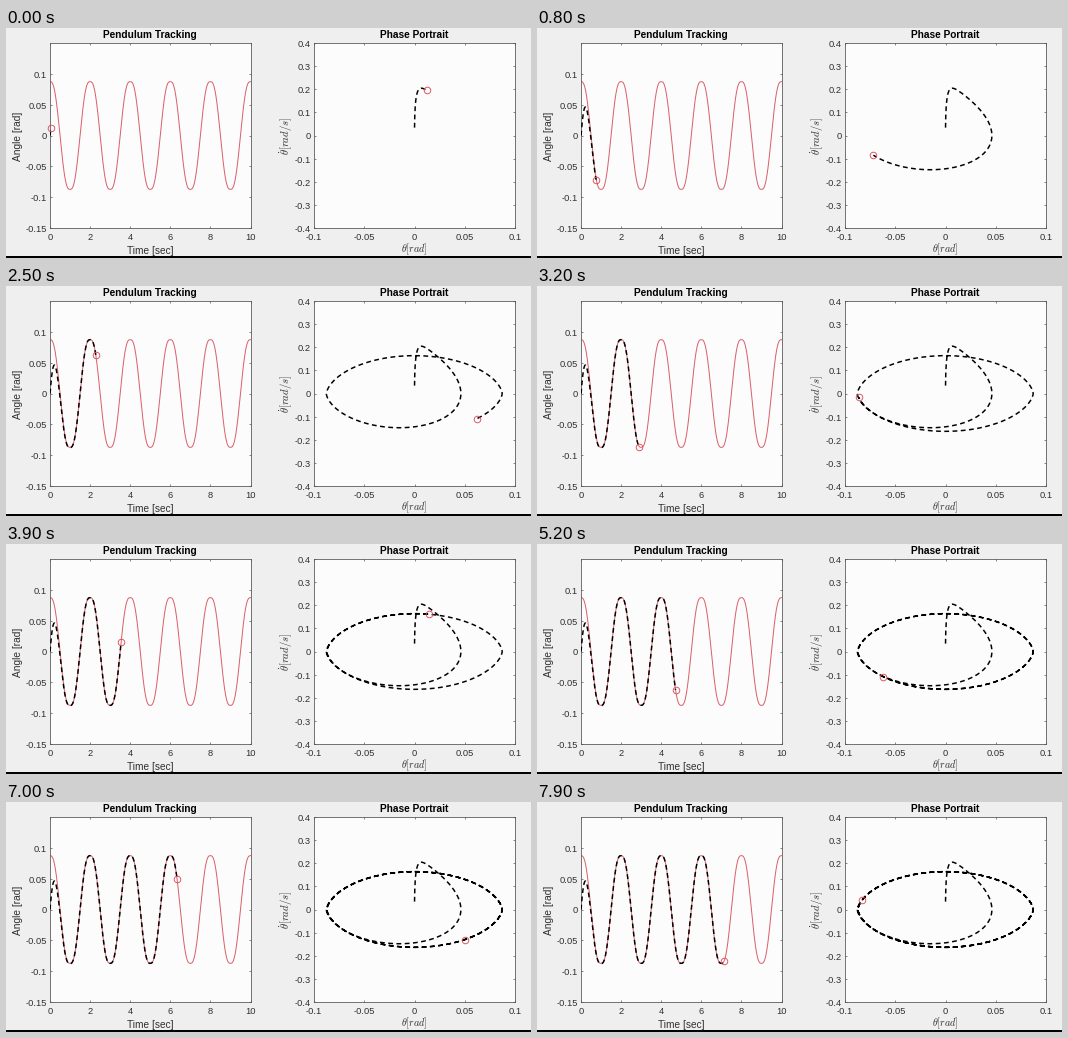
Animation, 525 px wide and 230 px high, one loop 8000 ms. Source, as a matplotlib script:

```python
import numpy as np
import matplotlib.pyplot as plt
from matplotlib.animation import FuncAnimation
from matplotlib.patches import Rectangle

W, H, DPI = 525, 230, 80
FRAMES, INTERVAL = 80, 100
PX = 72 / DPI  # points per pixel

AMP = np.deg2rad(5)
SLOW, FAST = 2.65, 80.0  # closed-loop poles
T0, STEP = 0.035, 0.09

BG, PANEL, INK, RED = "#efeff0", "#fcfcfd", "#303030", "#d9616b"
plt.rcParams.update({
    "font.family": "Liberation Sans",
    "mathtext.fontset": "cm",
    "axes.unicode_minus": False,
})


def reference(t):
    """Quintic swings between +AMP and -AMP, one per second."""
    n = np.floor(t)
    u = t - n
    sign = 1 - 2 * (n % 2)
    angle = sign * AMP * (1 - 2 * u**3 * (10 - 15 * u + 6 * u**2))
    rate = -sign * AMP * 30 * (u * (1 - u)) ** 2
    return angle, rate


def pendulum(t):
    """Reference plus the decaying start-up error."""
    angle, rate = reference(t)
    tau = 2 * t
    slow, fast = np.exp(-SLOW * tau), np.exp(-FAST * tau)
    gap = FAST - SLOW
    error = -AMP * (FAST * slow - SLOW * fast) / gap
    error_rate = AMP * FAST * SLOW * (slow - fast) / gap
    return angle + error, rate + error_rate


fig = plt.figure(figsize=(W / DPI, H / DPI), dpi=DPI, facecolor=BG)


def label(x, y, text, size, **kw):
    kw = {"ha": "center", "va": "center", "color": INK, **kw}
    fig.text(x / W, 1 - y / H, text, fontsize=size * PX, **kw)


def make_axes(left, right, xlim, ylim, xticks, yticks, title):
    top, bottom = 15, 200
    ax = fig.add_axes([left / W, 1 - bottom / H,
                       (right - left) / W, (bottom - top) / H],
                      facecolor=PANEL)
    ax.set(xlim=xlim, ylim=ylim, xticks=xticks, yticks=yticks)
    ax.tick_params(direction="in", top=True, right=True, length=2.2 * PX,
                   width=0.7 * PX, color="#555555",
                   labelbottom=False, labelleft=False)
    for spine in ax.spines.values():
        spine.set(linewidth=0.8 * PX, color="#555555")
    for v in xticks:
        x = left + (v - xlim[0]) / (xlim[1] - xlim[0]) * (right - left)
        label(x, 209, f"{v:g}", 9.3)
    for v in yticks:
        y = bottom - (v - ylim[0]) / (ylim[1] - ylim[0]) * (bottom - top)
        label(left - 3, y + 0.5, f"{v:g}", 9.3, ha="right",
              va="center_baseline")
    label((left + right) / 2, 7.5, title, 10.1, weight="bold", color="black")
    return ax


def tracer(ax):
    trail, = ax.plot([], [], color="black", lw=1.5 * PX, zorder=3,
                     dashes=(3.2, 2.3), dash_capstyle="butt")
    dot, = ax.plot([], [], "o", ms=6.6 * PX, mfc="none", mec="#dc4f5a",
                   mew=0.9 * PX, zorder=4, clip_on=False)
    return trail, dot


track = make_axes(44, 244.5, (0, 10), (-0.15, 0.15), range(0, 11, 2),
                  np.round(np.arange(-3, 3) * 0.05, 2), "Pendulum Tracking")
phase = make_axes(308, 509, (-0.1, 0.1), (-0.4, 0.4),
                  np.round(np.arange(-2, 3) * 0.05, 2),
                  np.round(np.arange(-4, 5) * 0.1, 1), "Phase Portrait")

label(144.5, 223, "Time [sec]", 10.1)
label(12, 108, "Angle [rad]", 10.1, rotation=90)
label(408.5, 221, r"$\theta[rad]$", 10.2)
label(280, 107.5, r"$\dot{\theta}[rad/s]$", 10.8, rotation=90)
fig.add_artist(Rectangle((0, 0), 1, 1.7 / H, transform=fig.transFigure,
                         color="black", lw=0))

grid = np.linspace(0, 10, 1001)
track.plot(grid, reference(grid)[0], color=RED, lw=1.0 * PX, zorder=2)
track_trail, track_dot = tracer(track)
phase_trail, phase_dot = tracer(phase)


def update(i):
    now = T0 + STEP * i
    t = np.append(np.arange(0.001, now, 0.002), now)
    angle, rate = pendulum(t)
    track_trail.set_data(t, angle)
    track_dot.set_data(t[-1:], angle[-1:])
    phase_trail.set_data(angle, rate)
    phase_dot.set_data(angle[-1:], rate[-1:])
    return track_trail, track_dot, phase_trail, phase_dot


anim = FuncAnimation(fig, update, frames=FRAMES, interval=INTERVAL,
                     repeat=True, repeat_delay=0)
plt.show()
```
